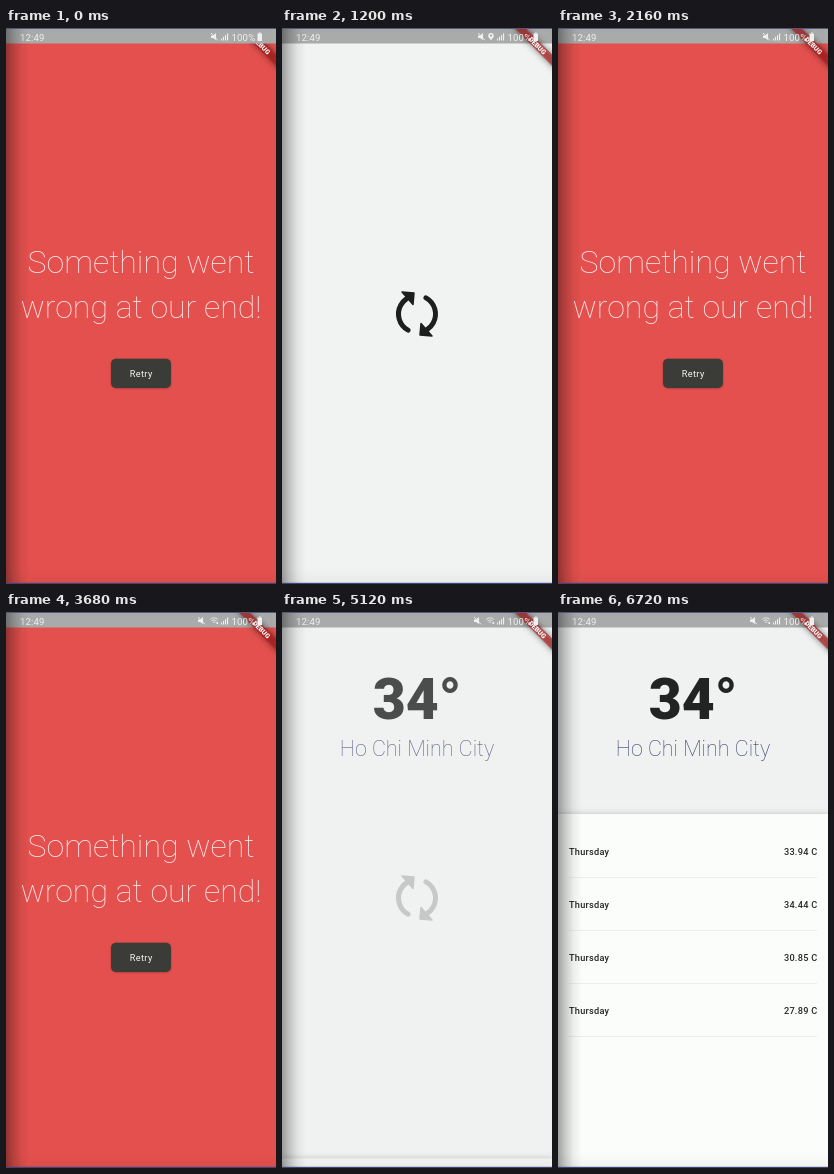
An HTML page with a canvas for the animation above (7.6 s loop, 270x556 px).

```html
<!DOCTYPE html>
<html lang="en">
<head>
<meta charset="utf-8">
<title>Weather retry</title>
<style>
html, body { margin: 0; width: 100%; height: 100%; overflow: hidden; background: #f0f2f1; }
canvas { display: block; width: 270px; height: 556px; }
</style>
</head>
<body>
<canvas id="stage"></canvas>
<script>
const W = 270, H = 556, LOOP = 7600, FADE = 300, BAR = 15.5;
const canvas = document.getElementById('stage');
const ctx = canvas.getContext('2d');
const dpr = window.devicePixelRatio || 1;
canvas.width = W * dpr;
canvas.height = H * dpr;

const clamp = v => Math.min(1, Math.max(0, v));
const easeInOutQuart = u => u < 0.5 ? 8 * u ** 4 : 1 - 8 * (1 - u) ** 4;

function rect(x, y, w, h, color) {
  ctx.fillStyle = color;
  ctx.fillRect(x, y, w, h);
}

function text(str, x, y, size, weight, color, align = 'left', spacing = 0) {
  ctx.font = `${weight} ${size}px Roboto, sans-serif`;
  ctx.letterSpacing = spacing + 'px';
  ctx.textAlign = align;
  ctx.fillStyle = color;
  ctx.fillText(str, x, y);
}

function poly(points, color) {
  ctx.fillStyle = color;
  ctx.beginPath();
  points.forEach(([x, y]) => ctx.lineTo(x, y));
  ctx.closePath();
  ctx.fill();
}

function withShadow(color, blur, dy, draw) {
  ctx.save();
  ctx.shadowColor = color;
  ctx.shadowBlur = blur * dpr;
  ctx.shadowOffsetY = dy * dpr;
  draw();
  ctx.restore();
}

function gradientRect(x, y, w, h, horizontal, stops) {
  const g = horizontal ? ctx.createLinearGradient(x, 0, x + w, 0) : ctx.createLinearGradient(0, y, 0, y + h);
  stops.forEach(([at, alpha]) => g.addColorStop(at, `rgba(0,0,0,${alpha})`));
  rect(x, y, w, h, g);
}

function errorPage() {
  const ink = 'rgba(255,255,255,.88)';
  rect(0, 0, W, H, '#e4504d');
  text('Something went', 135, 245, 32.1, 100, ink, 'center');
  text('wrong at our end!', 135, 290.3, 32.1, 100, ink, 'center');
  withShadow('rgba(0,0,0,.3)', 2, 0.5, () => {
    ctx.fillStyle = '#3b3c38';
    ctx.beginPath();
    ctx.roundRect(105, 330.7, 60, 29.3, 5);
    ctx.fill();
  });
  text('Retry', 135.2, 348.5, 9.2, 400, '#f4f4f2', 'center', 0.35);
}

function loaderPage() {
  const ink = '#1d1f1e', rad = Math.PI / 180;
  rect(0, 0, W, H, '#f0f3f2');
  ctx.save();
  ctx.translate(135, 286);
  for (let i = 0; i < 2; i++) {
    ctx.strokeStyle = ink;
    ctx.lineWidth = 5;
    ctx.lineCap = 'round';
    ctx.beginPath();
    ctx.arc(0, 0, 18.5, 119 * rad, 235 * rad);
    ctx.stroke();
    ctx.lineWidth = 1.5;
    ctx.lineJoin = 'round';
    poly([[-15, -22], [-3, -21], [-4, -9.5]], ink);
    ctx.stroke();
    ctx.rotate(Math.PI);
  }
  ctx.restore();
}

function weatherPage(panelY) {
  rect(0, 0, W, H, '#f0f2f2');
  text('34°', 135, 107, 57, 800, '#222423', 'center');
  text('Ho Chi Minh City', 135, 144, 21.5, 100, '#393d68', 'center');
  withShadow('rgba(0,0,0,.16)', 5, -1, () => rect(0, panelY, W, H, '#fafdf9'));
  ['33.94 C', '34.44 C', '30.85 C', '27.89 C'].forEach((temp, i) => {
    const y = panelY + i * 53;
    text('Thursday', 11, y + 40.5, 9.2, 500, '#252725', 'left', 0.25);
    text(temp, 259.4, y + 40.5, 9.2, 500, '#252725', 'right', 0.25);
    rect(11, y + 63, 248, 1, '#eceeec');
  });
}

function bannerShape() {
  ctx.beginPath();
  ctx.rect(-30, 18.4, 60, 7.9);
  ctx.fill();
}

function banner() {
  const away = 1000, x = W + 1, y = 1.5;
  ctx.save();
  // The shadow alone: its caster sits off stage.
  ctx.shadowColor = 'rgba(0,0,0,.5)';
  ctx.shadowBlur = 6 * dpr;
  ctx.shadowOffsetX = away * dpr;
  ctx.fillStyle = '#000';
  ctx.translate(x - away, y);
  ctx.rotate(Math.PI / 4);
  bannerShape();
  ctx.restore();

  ctx.save();
  ctx.translate(x, y);
  ctx.rotate(Math.PI / 4);
  ctx.fillStyle = 'rgba(183,28,28,.63)';
  bannerShape();
  text('DEBUG', 0.5, 24.8, 6.7, 900, '#fff', 'center');
  ctx.restore();
}

function muteIcon(x, color) {
  poly([[x, 7.5], [x + 2, 7.5], [x + 5, 5], [x + 5, 12], [x + 2, 10], [x, 10]], color);
  ctx.strokeStyle = color;
  ctx.lineWidth = 0.9;
  ctx.beginPath();
  ctx.moveTo(x, 5);
  ctx.lineTo(x + 7, 12.3);
  ctx.stroke();
}

function pinIcon(x, color) {
  ctx.fillStyle = color;
  ctx.beginPath();
  ctx.arc(x, 7.7, 2.7, 0, 7);
  ctx.fill();
  poly([[x - 2.5, 8.5], [x + 2.5, 8.5], [x, 12.6]], color);
  ctx.fillStyle = '#999b9a';
  ctx.beginPath();
  ctx.arc(x, 7.6, 1, 0, 7);
  ctx.fill();
}

function wifiIcon(x, color) {
  ctx.strokeStyle = color;
  ctx.lineWidth = 0.8;
  [2, 4, 6].forEach(r => {
    ctx.beginPath();
    ctx.arc(x, 12, r, -2.25, -0.9);
    ctx.stroke();
  });
  rect(x + 2.5, 10, 1.6, 2, color);
}

function statusIcons(t) {
  const ink = '#eff0ef';
  const locating = t >= 960 && t < 2080, wifi = t >= 3040;
  text('12:49', 14, 12.5, 9.6, 400, ink, 'left', 0.15);
  muteIcon(wifi ? 192 : locating ? 196 : 205, ink);
  if (locating) pinIcon(209, ink);
  if (wifi) wifiIcon(208, ink);
  for (let i = 0; i < 4; i++) rect(215 + i * 2, 10.5 - i * 1.7, 1.1, 2 + i * 1.7, ink);
  text('100%', 225.5, 12.5, 9.6, 400, ink, 'left', 0.15);
  rect(251.5, 5.5, 4.5, 7.5, ink);
  rect(252.8, 4.5, 2, 1, ink);
}

function drawFrame(t) {
  const panelY = 556 - 354 * easeInOutQuart(clamp((t - 4880) / 1000));
  const pages = [
    [-FADE, errorPage],
    [880, loaderPage],
    [1840, errorPage],
    [3920, loaderPage],
    [4880, () => weatherPage(panelY)]
  ];
  const statusBar = () => rect(0, 0, W, BAR, '#a9abaa');
  const layers = t < 640 ? [banner, statusBar] : [statusBar, banner];

  ctx.setTransform(dpr, 0, 0, dpr, 0, 0);
  pages.forEach(([start, draw], i) => {
    const next = pages[i + 1];
    if (t < start || (next && t >= next[0] + FADE)) return;
    ctx.globalAlpha = clamp((t - start) / FADE);
    draw();
  });
  ctx.globalAlpha = 1;
  layers.forEach(draw => draw());
  statusIcons(t);
  gradientRect(0, 0, 24, H, true, [[0, 0.36], [0.3, 0.2], [0.65, 0.06], [1, 0]]);
  gradientRect(0, 540, W, 16, false, [[0, 0], [1, 0.04]]);
  rect(0, 0, W, 1, '#55587c');
  rect(0, 554.8, W, 1.2, '#43437c');
}

function tick() {
  drawFrame(performance.now() % LOOP);
  requestAnimationFrame(tick);
}
tick();
</script>
</body>
</html>
```
